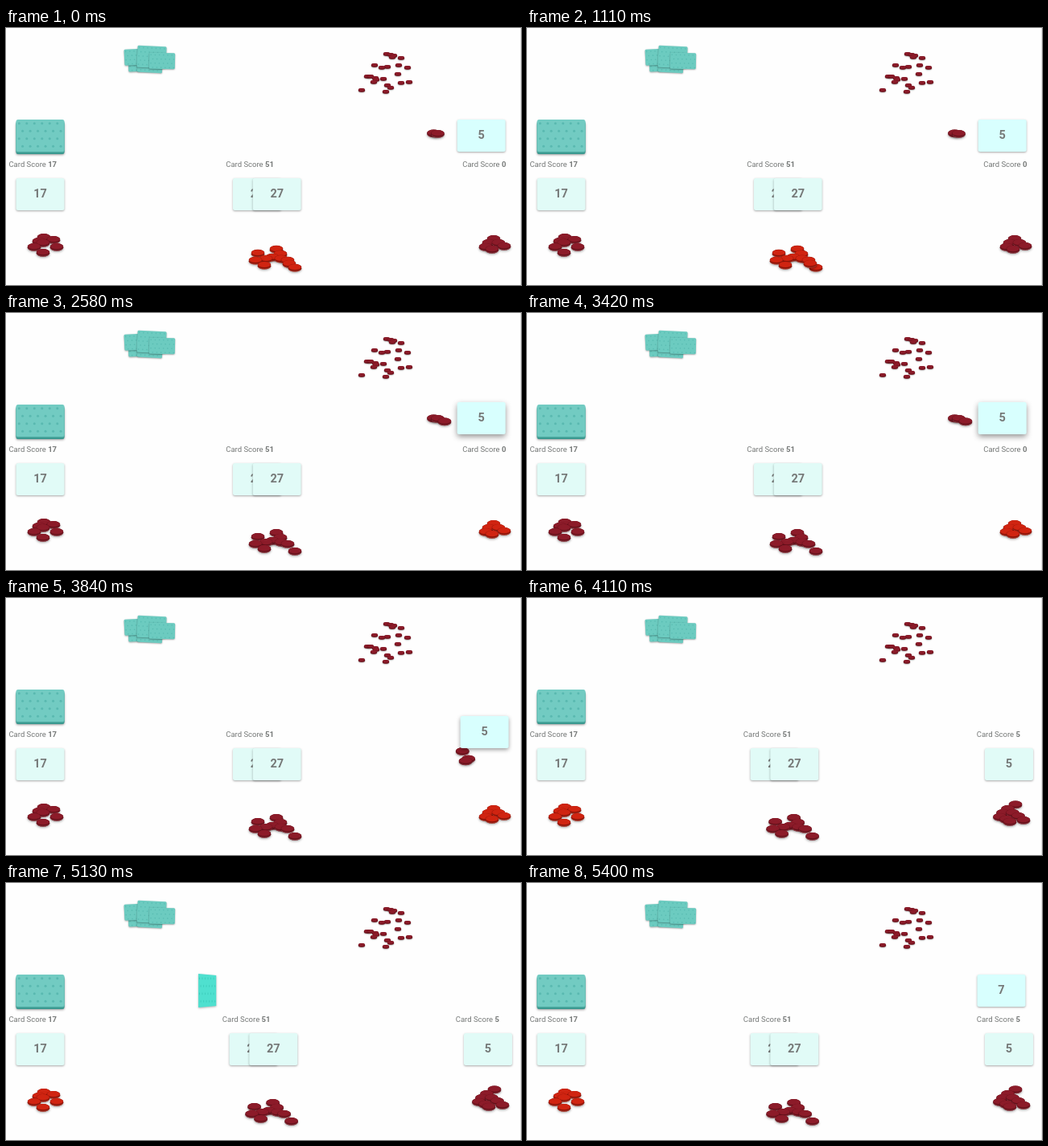
An HTML page with a canvas for the animation above (5.43 s loop, 640 by 320 pixels).

```html
<!DOCTYPE html>
<html lang="en">
<head>
<meta charset="utf-8">
<title>Card table</title>
<style>
html, body { margin: 0; width: 100%; height: 100%; overflow: hidden; background: #fefefe; }
canvas { display: block; width: 640px; height: 320px; }
</style>
</head>
<body>
<canvas id="stage" width="640" height="320"></canvas>
<script>
const ctx = document.getElementById('stage').getContext('2d');
const LOOP = 5430;
const FLIGHT = 540;
const THROW = 1110, HOVER = 2250, TAKE = 3420, DEAL = 4740;
const W = 60, H = 40;
const FONT = 'Roboto, sans-serif';
const INK = '#757877';
const HAND = '#e1fbf7', FACE = '#d8fffe';

const DARK = { top: '#8c1b29', side: '#65111b', rim: '#b25b62' };
const BRIGHT = { top: '#d02411', side: '#8c1409', rim: '#c95a4b' };

const leftChips = [[47, 260], [59, 263], [41, 265], [46, 267], [35, 272], [63, 272], [46, 279]];
const midChips = [[336, 273], [313, 278], [341, 279], [331, 283], [310, 287], [323, 285],
  [342, 285], [350, 287], [321, 293], [359, 296]];
const rightChips = [[606, 262], [600, 267], [612, 267], [596, 272], [619, 271], [604, 275]];
const potChips = [[531.5, 130.5], [536.5, 131]];
const thrown = { from: [352, 293], to: [545, 134.5] };
const taken = [[607, 256.5], [617, 276], [600, 278]];
const bank = [[473, 32], [478, 33], [482, 34], [480, 36], [491, 37], [458, 46], [488, 46],
  [474, 48], [467, 49], [499, 49], [487, 57], [449, 60], [453, 60], [459, 62], [469, 63],
  [460, 64], [457, 67], [501, 67], [491, 68], [474, 71], [478, 74], [442, 77], [472, 79]];
const discards = [[169, 44, 34, 20, -.04], [179, 45, 31, 21, .06], [164, 36, 34, 20, -.05],
  [181, 36, 36, 27, .05], [194, 41, 32, 20, .02]];

const clamp = v => Math.max(0, Math.min(1, v));
const mix = (a, b, p) => a + (b - a) * p;
const mixPoint = (a, b, p) => [mix(a[0], b[0], p), mix(a[1], b[1], p)];
const shift = (list, dx, dy = 0) => list.map(([x, y]) => [x + dx, y + dy]);
const flight = (t, start) => clamp((t - start) / FLIGHT) ** 3;

function ellipse(x, y, rx, ry, color) {
  ctx.fillStyle = color;
  ctx.beginPath();
  ctx.ellipse(x, y, rx, ry, 0, 0, Math.PI * 2);
  ctx.fill();
}

function shadow(alpha, blur, dy) {
  ctx.shadowColor = `rgba(0,0,0,${alpha})`;
  ctx.shadowBlur = blur;
  ctx.shadowOffsetY = dy;
}

function chip([x, y], skin = DARK, s = 1) {
  ctx.save();
  ctx.translate(x, y);
  ctx.scale(s, s);
  ctx.save();
  shadow(.35, 3 * s, 1.2 * s);
  ellipse(0, 1.6, 8.4, 4.2, skin.side);
  ctx.restore();
  ctx.strokeStyle = skin.rim;
  ctx.lineWidth = .5;
  ctx.beginPath();
  ctx.ellipse(0, 1.2, 8, 4, 0, .3, Math.PI - .3);
  ctx.stroke();
  ellipse(0, 0, 8.3, 4, skin.side);
  ellipse(0, -.3, 7.9, 3.6, skin.top);
  ctx.restore();
}

function pile(list, skin) {
  [...list].sort((a, b) => a[1] - b[1]).forEach(p => chip(p, skin));
}

function roundRect(x, y, w, h, r, color) {
  ctx.fillStyle = color;
  ctx.beginPath();
  ctx.roundRect(x, y, w, h, r);
  ctx.fill();
}

function number(n, x, y) {
  ctx.font = `bold 14.5px ${FONT}`;
  ctx.fillStyle = INK;
  ctx.textAlign = 'center';
  ctx.fillText(n, x, y);
}

function card(n, x, y, color, lift = 0) {
  ctx.save();
  shadow(mix(.35, .42, lift), mix(2.5, 7, lift), mix(1, 3, lift));
  roundRect(x, y, W, H, 2.5, color);
  ctx.restore();
  number(n, x + W / 2, y + 24.4);
}

// Staggered dots on the back of a card, centred on the current origin.
function dots(w, h, step, r, color) {
  for (let row = 0, y = -h / 2 + step / 2; y < h / 2; y += step, row++) {
    for (let x = -w / 2 + step * (row % 2 ? .85 : .4); x < w / 2 - 1; x += step) {
      ellipse(x, y, r, r, color);
    }
  }
}

function deck() {
  ctx.save();
  shadow(.4, 3, 1);
  roundRect(12.5, 117, W, H, 2.5, '#36958c');
  ctx.restore();
  roundRect(12.5, 115.5, W, H, 2.5, '#4ba99f');
  roundRect(12.5, 114, W, H, 2.5, '#72cbc2');
  ctx.save();
  ctx.translate(42.5, 134);
  dots(W, H, 9.5, 1.5, 'rgba(50,155,146,.38)');
  ctx.restore();
}

function discardPile() {
  for (const [x, y, w, h, turn] of discards) {
    ctx.save();
    ctx.translate(x, y);
    ctx.rotate(turn);
    ctx.save();
    shadow(.35, 2, .8);
    roundRect(-w / 2, -h / 2, w, h, 1.5, '#6ccbc0');
    ctx.restore();
    dots(w, h, 5.2, .8, 'rgba(50,160,150,.32)');
    ctx.restore();
  }
}

function turningCard(p, n) {
  const angle = p * Math.PI, c = Math.cos(angle);
  const depth = 30 * Math.sin(angle) * .0018;
  const half = 30 * c, tall = 20 * (1 + depth), low = 20 * (1 - depth);
  ctx.save();
  ctx.translate(mix(42.5, 589.5, p), 134);
  ctx.save();
  shadow(.3, 2.5, 1);
  ctx.fillStyle = c > 0 ? '#4fe0cf' : FACE;
  ctx.beginPath();
  ctx.moveTo(-half, -tall);
  ctx.lineTo(half, -low);
  ctx.lineTo(half, low);
  ctx.lineTo(-half, tall);
  ctx.fill();
  ctx.restore();
  ctx.scale(Math.abs(c), 1);
  if (c > 0) dots(W, H, 9.5, 1.5, 'rgba(40,180,166,.4)');
  else number(n, 0, 4.4);
  ctx.restore();
}

function label(x, score) {
  ctx.textAlign = 'left';
  ctx.fillStyle = INK;
  ctx.font = `9.5px ${FONT}`;
  const text = 'Card Score ';
  ctx.fillText(text, x, 173.2);
  const w = ctx.measureText(text).width;
  ctx.font = `bold 9.5px ${FONT}`;
  ctx.fillText(score, x + w, 173.2);
}

function draw(t) {
  ctx.fillStyle = '#fefefe';
  ctx.fillRect(0, 0, 640, 320);
  ctx.fillStyle = '#e6e6e6';
  ctx.fillRect(639, 0, 1, 320);

  const passed = t >= THROW + FLIGHT;
  const took = t >= TAKE + FLIGHT;
  const midX = took ? -4.4 : 0;
  const rightX = took ? -8.5 : 0;

  discardPile();
  bank.forEach(p => chip(p, DARK, .5));
  deck();

  label(3.4, 17);
  label(273.2 + midX, 51);
  label(567.2 + rightX, took ? 5 : 0);

  card(17, 12.5, 187, HAND);
  card(24, 282 + midX, 187, HAND);
  card(27, 306.7 + midX, 187, HAND);

  pile(leftChips, took ? BRIGHT : DARK);
  if (passed) pile(shift(midChips, midX), DARK);
  else {
    const hand = shift(midChips, 0, 1.8);
    if (t < THROW) hand.push(thrown.from);
    pile(hand, BRIGHT);
  }

  const right = shift(rightChips, rightX);
  pile(took ? right.concat(taken) : right, passed && !took ? BRIGHT : DARK);

  if (!took) {
    const p = flight(t, TAKE);
    const pot = potChips.concat(passed ? [thrown.to] : []);
    pot.forEach((at, i) => chip(mixPoint(at, taken[i], p)));
    if (t >= THROW && !passed) chip(mixPoint(thrown.from, thrown.to, flight(t, THROW)), BRIGHT);
    const h = clamp((t - HOVER) / 250);
    const lift = h * (2 - h) * (1 - p);
    card(5, mix(560.7, 569, p), mix(114, 187, p) - 3 * lift, p < .5 ? FACE : HAND, lift);
  } else {
    card(5, 569, 187, HAND);
    const p = flight(t, DEAL);
    if (p >= 1) card(7, 559.5, 114, FACE);
    else if (t > DEAL) turningCard(p, 7);
  }
}

const begin = performance.now();
function tick() {
  draw((performance.now() - begin) % LOOP);
  requestAnimationFrame(tick);
}
tick();
</script>
</body>
</html>
```
